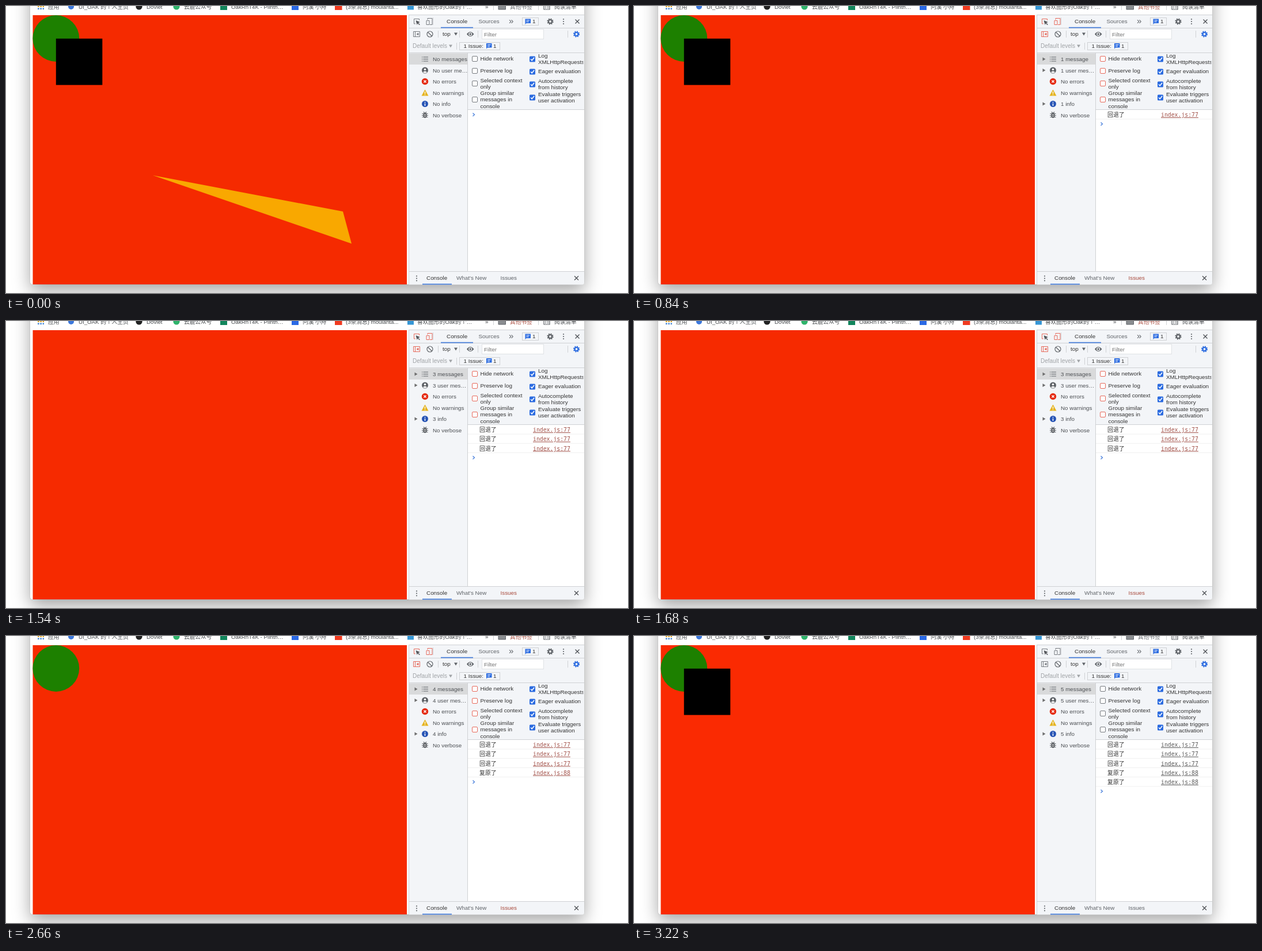
An HTML page that plays this animation: 1080 px wide and 500 px high, repeating every 3.57 s.

```html
<!DOCTYPE html>
<html lang="zh">
<head>
<meta charset="utf-8">
<title>Undo and redo</title>
<style>
html, body { margin: 0; width: 100%; height: 100%; overflow: hidden; background: #fff; }
#win { position: absolute; left: 42px; top: -60px; width: 962px; height: 545px; background: #fff;
  border-radius: 4px; box-shadow: 0 11px 30px rgba(0,0,0,.36), 0 0 1px rgba(0,0,0,.4); }
svg { position: absolute; left: 0; top: 0; width: 1080px; height: 500px;
  --edge: #777b80; --link: #5a5a5a; --soft: #5f6368; --canvas: #f52a00; }
svg.warm { --edge: #e66a5c; --link: #a2524a; --soft: #a84a3c; --canvas: #f62a00; }
svg.late { --canvas: #fa2a02; }
text { font: 9.9px "Liberation Sans", Arial, "Noto Sans CJK SC", "Noto Sans CJK", sans-serif; fill: #333; }
.bar text { font-size: 9.7px; fill: #45484b; }
.grey { fill: #5f6368; }
.soft { fill: var(--soft) !important; }
.mono { font-family: "DejaVu Sans Mono", monospace; font-size: 9.8px; fill: var(--link); text-decoration: underline; }
.line { fill: none; stroke: #5f6368; stroke-width: 1.2; }
.edge { fill: none; stroke: var(--edge); stroke-width: 1; }
.rule { stroke: #cfd1d4; stroke-width: 1; fill: none; }
.blue { fill: #2b6be0; }
.side text { fill: #4c4f53; font-size: 9.8px; }
.bare .fade { visibility: hidden; }
.bare #warn { fill: #ee2a10; }
</style>
</head>
<body>
<div id="win"></div>
<svg id="stage" viewBox="0 0 1080 500">
  <defs>
    <g id="gear">
      <circle r="4.6" fill="none" stroke="currentColor" stroke-width="2" stroke-dasharray="1.9 1.71"/>
      <circle r="3" fill="none" stroke="currentColor" stroke-width="2.2"/>
    </g>
    <path id="cross" d="M-3.5-3.5 3.5 3.5M3.5-3.5-3.5 3.5" stroke="#4b4f54" stroke-width="1.3"/>
    <g id="dots" fill="#5f6368"><circle cy="-4" r="1.1"/><circle r="1.1"/><circle cy="4" r="1.1"/></g>
    <g id="note">
      <path class="blue" d="M0 0H9.500V7.500H2L0 9.500Z"/>
      <path d="M2 2.500H7.500M2 5H6" stroke="#fff"/>
    </g>
    <clipPath id="pane"><rect x="802" y="80" width="200.500" height="101"/></clipPath>
  </defs>

  <g class="bar">
    <g stroke-width="2.600" stroke-dasharray="2.600 1.700">
      <path d="M55 .6H66" stroke="#e0a526"/><path d="M55 4.800H66" stroke="#4285d8"/>
    </g>
    <circle cx="113" cy="1" r="5" fill="#3c78dc"/>
    <circle cx="231" cy="1" r="5.600" fill="#222"/>
    <circle cx="296" cy="1" r="5.600" fill="#2fb36b"/>
    <rect x="372" y="-5" width="12" height="12" fill="#12855c"/>
    <rect x="496" y="-5" width="12" height="12" fill="#2a69e5"/>
    <rect x="571" y="-5" width="12.500" height="12" fill="#f03a20"/>
    <rect x="697" y="-5" width="11" height="11.500" fill="#3697d6"/>
    <text x="73" y="4.500">应用</text>
    <text x="126" y="4.500">UI_OAK 的个人主页</text>
    <text x="244" y="4.500">Dovlet</text>
    <text x="309" y="4.500">云鹿公众号</text>
    <text x="391" y="4.500">OakRnT4K - Plinth…</text>
    <text x="515" y="4.500">问溪 小舟</text>
    <text x="590" y="4.500">(3条消息) moulanta...</text>
    <text x="714" y="4.500">喜欢图形的Oak的个…</text>
    <text x="832" y="4.500">»</text>
    <path class="rule" d="M846.500 0V7"/>
    <path d="M855-2H867.500V6H855Z" fill="#8b8e91" stroke="#5f6368"/>
    <text class="soft" x="875" y="4.500">其他书签</text>
    <path class="rule" d="M924.500 0V7"/>
    <path class="line" d="M934-3H944V6H934ZM936 1H938M939.500 1H942.500M936 3.500H938M939.500 3.500H942.500"/>
    <text x="952" y="4.500">阅读清单</text>
  </g>

  <rect x="46.500" y="16" width="649.500" height="469" fill="var(--canvas)"/>
  <g id="shapes">
    <circle cx="86.800" cy="56.500" r="40.400" fill="#1d8000"/>
    <rect x="86.800" y="56.800" width="80.500" height="80.800"/>
    <path d="M255 295 585 358 600 414Z" fill="#f9a800"/>
  </g>

  <path d="M699.500 15.500H1004V181H802V463H1004V482Q1004 485.500 1000 485.500H699.500Z" fill="#f3f5f8"/>
  <rect x="802" y="181" width="202" height="282" fill="#fff"/>
  <path class="rule" d="M699.500 15.500V485M699 15.500H1004M699 38.500H1004M802 81.500H1004M699 81.500H802M801.500 82V463M802 180.500H1004M699 462.500H1004"/>
  <path class="rule" d="M741.500 20V33M750.500 43V55M787.500 43V55M819.500 43V55M975.500 43V55M782.500 64V76"/>
  <path d="M755 37.700H811M723 484.600H774" stroke="#4a80dc" stroke-width="1.700"/>

  <path class="edge" d="M711 31H708.500V22.500H717.500V25"/>
  <path d="M711.500 25 719 28 716 29.300 718.800 32.200 717.700 33.200 715 30.300 713.700 33Z" fill="#55585c"/>
  <path class="edge" d="M732 24V21.500H740V32.500H736M730 25.500H735V32.500H730Z"/>
  <text x="765" y="30">Console</text>
  <text class="grey" x="820.500" y="30">Sources</text>
  <text class="grey" x="873" y="31" style="font-size:15px">»</text>
  <rect class="rule" x="896.500" y="20.500" width="28" height="13"/>
  <use href="#note" x="901.500" y="22.500"/>
  <text x="914" y="30.300">1</text>
  <use href="#gear" x="945" y="27" color="#5f6368"/>
  <use href="#dots" x="968" y="27"/>
  <use href="#cross" x="992" y="27"/>

  <path class="edge" d="M707.500 44.500H718.500V53.500H707.500ZM710.500 44.500V53.500"/>
  <path d="M716.500 46.500V51.500L712.500 49Z" fill="var(--edge)"/>
  <path class="line" d="M731 49A5 5 0 1 0 741 49 5 5 0 1 0 731 49M732.500 45.500 739.500 52.500"/>
  <text x="758" y="52">top</text>
  <path class="grey" d="M778 46.500H784L781 51.500Z"/>
  <path class="grey" d="M800 49Q806 41 812.500 49 806 57 800 49Z"/>
  <circle cx="806.200" cy="49" r="2.400" fill="#5f6368" stroke="#f3f5f8" stroke-width="1.300"/>
  <rect x="826.500" y="40.500" width="107" height="17" fill="#fff" stroke="#e0e2e5"/>
  <text x="830" y="52.500" style="fill:#757575">Filter</text>
  <use href="#gear" x="990.500" y="49" color="#2b6be0"/>
  <text x="706" y="73" style="fill:#a0a3a6;font-size:10px">Default levels</text>
  <path d="M769 67.500H775L772 72.500Z" fill="#a0a3a6"/>
  <rect class="rule" x="787.500" y="63.500" width="70" height="13"/>
  <text x="794.500" y="73">1 Issue:</text>
  <use href="#note" x="834" y="65"/>
  <text x="846" y="73">1</text>

  <rect x="700" y="82.500" width="101" height="19.500" fill="#d9dadb"/>
  <g class="side" id="side">
    <g class="fade">
      <path class="line" d="M724.500 89H733M724.500 92.500H733M724.500 96H733M722 89H723.300M722 92.500H723.300M722 96H723.300"/>
      <circle cx="727.500" cy="112" r="5.500" fill="#5f6368"/>
      <circle cx="727.500" cy="110.500" r="1.800" fill="#fff"/>
      <path d="M724 115.500Q727.500 111.500 731 115.500 727.500 118 724 115.500Z" fill="#fff"/>
      <circle cx="727.500" cy="170.500" r="5.500" fill="#2855b5"/>
      <path d="M727.500 167V168.600M727.500 169.700V174" stroke="#fff" stroke-width="1.500"/>
    </g>
    <circle cx="727.500" cy="131.500" r="5.700" fill="#e52b14"/>
    <path d="M725.500 129.500 729.500 133.500M729.500 129.500 725.500 133.500" stroke="#fff" stroke-width="1.400"/>
    <path id="warn" d="M727.500 145.500 733.500 156.500H721.500Z" fill="#e5b420"/>
    <path d="M727.500 149V153M727.500 154V155.300" stroke="#fff" stroke-width="1.300"/>
    <ellipse cx="727.500" cy="190.500" rx="3.200" ry="4.600" fill="#55585c"/>
    <path class="line" d="M722.500 187.500H732.500M722 190.500H733M722.500 193.500H732.500M725 184.500 727 186.500M730 184.500 728 186.500"/>
    <path d="M726 189.300H729M726 192H729" stroke="#fff"/>
    <g id="arrows" fill="#6e6e6e">
      <path d="M709.500 89.500V95.500L714.500 92.500ZM709.500 109V115L714.500 112ZM709.500 167.500V173.500L714.500 170.500Z"/>
    </g>
    <text id="all" x="741" y="96"></text>
    <text id="user" x="741" y="115.500"></text>
    <text x="741" y="135">No errors</text>
    <text x="741" y="154.500">No warnings</text>
    <text id="info" x="741" y="174"></text>
    <text x="741" y="193.500">No verbose</text>
  </g>

  <g id="options" clip-path="url(#pane)"></g>

  <g id="log"></g>
  <path id="prompt" d="M810.500 186.500 813.500 189.200 810.500 192" fill="none" stroke="#4a80dc" stroke-width="1.300"/>

  <use href="#dots" x="713" y="474.500"/>
  <text x="730" y="477">Console</text>
  <text class="grey" x="782" y="477">What's New</text>
  <text class="soft" x="858.500" y="477">Issues</text>
  <use href="#cross" x="990.500" y="474"/>
</svg>

<script>
const LOOP = 3570, ROW = 16.25;
const $ = id => document.getElementById(id);
const stage = $('stage');

// start time, shapes on the canvas, counted messages, printed rows
const steps = [
  [0, 3, 0, 0], [840, 2, 1, 1], [1050, 1, 2, 2], [1260, 1, 3, 2],
  [1400, 0, 3, 3], [2520, 1, 4, 4], [3010, 2, 5, 5]
];

const option = (x, y, lines, on) => {
  const box = on
    ? `<rect class="blue" x="${x}" y="${y - 4.5}" width="10" height="10" rx="1.500"/>
       <path d="M${x + 2} ${y + .5}l2.200 2.300 4-5" fill="none" stroke="#fff" stroke-width="1.500"/>`
    : `<rect x="${x}" y="${y - 4.5}" width="9" height="9" rx="1.500" class="edge" style="fill:#fff"/>`;
  const top = y + 3.3 - (lines.length - 1) * 5.6;
  const left = x + (on ? 15 : 14);
  return box + lines.map((s, i) => `<text x="${left}" y="${top + i * 11.2}">${s}</text>`).join('');
};

$('options').innerHTML = [
  option(809.5, 92, ['Hide network']),
  option(809.5, 113, ['Preserve log']),
  option(809.5, 135, ['Selected context', 'only']),
  option(809.5, 163, ['Group similar', 'messages in', 'console']),
  option(909, 92, ['Log', 'XMLHttpRequests'], true),
  option(909, 114, ['Eager evaluation'], true),
  option(909, 136, ['Autocomplete', 'from history'], true),
  option(909, 159, ['Evaluate triggers', 'user activation'], true)
].join('');

$('log').innerHTML = Array.from({ length: 5 }, (_, i) => {
  const [word, line] = i < 3 ? ['回退了', 77] : ['复原了', 88];
  return `<g transform="translate(0 ${i * ROW})">
    <text x="822" y="193">${word}</text>
    <text class="mono" x="915" y="193">index.js:${line}</text>
    <path d="M802 197H1004" stroke="#f0f0f0"/></g>`;
}).join('');

const showFirst = (group, n) =>
  [...group.children].forEach((el, i) => el.style.display = i < n ? '' : 'none');

let current = -1;
function draw(now) {
  const t = now % LOOP;
  const k = steps.findLastIndex(s => s[0] <= t);
  if (k !== current) {
    current = k;
    const [, shapes, count, rows] = steps[k];
    const n = count || 'No';
    showFirst($('shapes'), shapes);
    showFirst($('log'), rows);
    $('prompt').setAttribute('transform', `translate(0 ${rows * ROW})`);
    $('arrows').style.display = count ? '' : 'none';
    $('all').textContent = `${n} message${count === 1 ? '' : 's'}`;
    $('user').textContent = count ? `${n} user mes…` : 'No user me…';
    $('info').textContent = `${n} info`;
    stage.classList.toggle('warm', count > 0 && count < 5);
    stage.classList.toggle('late', count === 5);
    stage.classList.toggle('bare', count > rows);
  }
  requestAnimationFrame(() => draw(performance.now()));
}
draw(performance.now());
</script>
</body>
</html>
```
